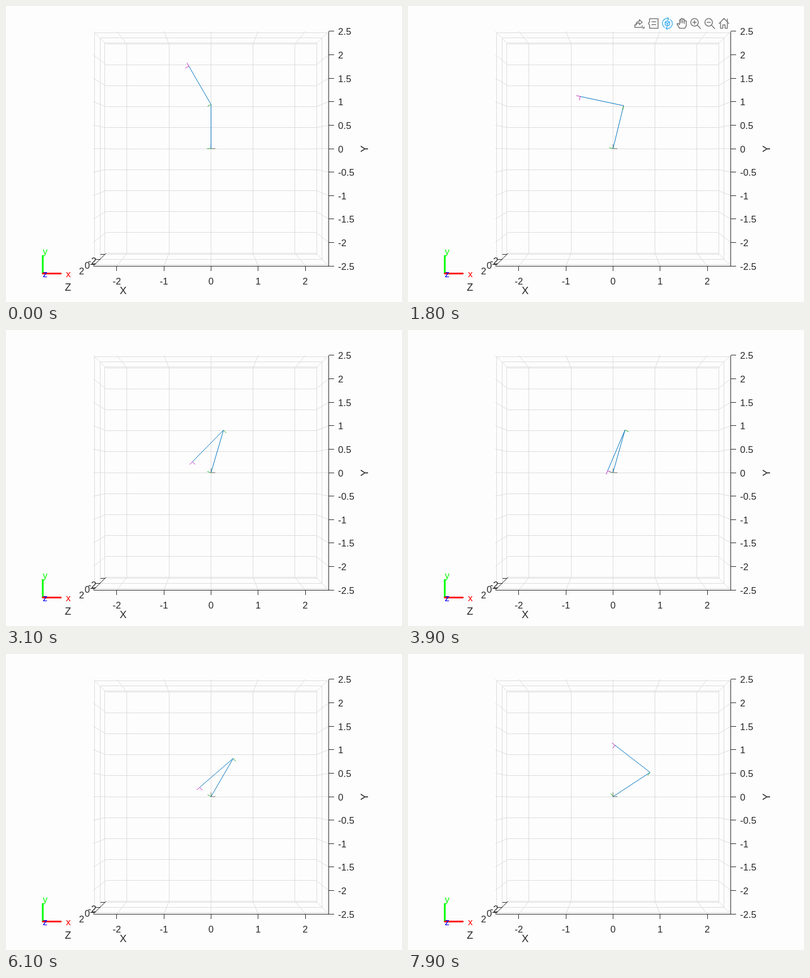
Recreate the animation shown at these times as an HTML page. Size 700x525 px, loop 8 s.

```html
<!DOCTYPE html>
<html lang="en">
<head>
<meta charset="utf-8">
<title>Two-link arm</title>
<style>
  html, body { margin: 0; width: 100%; height: 100%; overflow: hidden; background: #fdfdfd; }
  svg { display: block; width: 700px; height: 525px; font-family: "Liberation Sans", Arial, sans-serif; }
  text { font-size: 16.67px; fill: #262626; }
  .name { font-size: 18.3px; }
  .mid { text-anchor: middle; }
  .grid, .axis { fill: none; stroke-width: 1; }
  .grid { stroke: #dcdcdc; }
  .axis { stroke: #262626; }
  .crisp { shape-rendering: crispEdges; }
  #arm { fill: none; stroke-width: 1; }
  #tools { fill: none; stroke: #757575; stroke-width: 1.5; stroke-linecap: round; stroke-linejoin: round;
    animation: show 8s step-end infinite; }
  @keyframes show { 0% { opacity: 0; } 6.25% { opacity: 1; } 28.75% { opacity: 0; } }
</style>
</head>
<body>
<svg viewBox="0 0 700 525">
  <path id="grid" class="grid crisp"/>
  <path id="slant" class="grid"/>
  <path id="axis" class="axis crisp"/>
  <path id="depth" class="axis"/>
  <g id="labels">
    <text x="145" y="458">-2</text>
    <text x="139" y="466">0</text>
    <text x="129" y="476">2</text>
    <text class="name mid" x="207" y="511">X</text>
    <text class="name mid" x="109.5" y="505">Z</text>
    <text class="name mid" transform="translate(640 253.5) rotate(-90)">Y</text>
  </g>

  <g fill="none" stroke-width="3">
    <path d="M65 442V475" stroke="#0f0"/>
    <path d="M64 474.5H98" stroke="#f00"/>
  </g>
  <text x="65" y="441" style="fill:#0f0">y</text>
  <text x="106" y="481" style="fill:#f00">x</text>
  <text x="65" y="481" style="fill:#00f">z</text>

  <g id="arm">
    <path id="world" stroke="#6f6f5c"/>
    <path id="baseY" stroke="#26a826"/>
    <path id="links" stroke="#0072bd"/>
    <path id="elbowY" stroke="#26a826"/>
    <path id="tip" stroke="#c22fc2"/>
  </g>

  <g id="tools">
    <path d="M401 33V38H414V35M403 34C403 29 406 27 409 27V24L414 29L409 33V30C406 30 404 31 403 34Z"/>
    <path d="M418 36V40H414Z" fill="#757575" stroke="none"/>
    <path d="M427 22.5H442V39.5H427V34L425 31L427 28ZM431 28H438M431 33H438"/>
    <g stroke="#4db5f2">
      <path d="M453.5 38A8.7 8.7 0 0 1 461 22.500M463.500 24A8.700 8.700 0 0 1 456 39.500M459 20.500L461 22.500L459 25M458 37L456 39.500L458 41.500"/>
      <path d="M458.5 26.5L462.5 28.5V33L458.5 35.5L454.5 33V28.5ZM454.5 28.5L458.5 31L462.5 28.5M458.5 31V35.5"/>
    </g>
    <path d="M480 39.5L475.5 32Q476 30 479 32L480 33V25Q481.5 23 482.5 25V30V23Q484 21 485.5 23V30V24Q487 22 488.5 24V31V27Q490.5 25 492 27V33Q492 37 489 39.5Z"/>
    <g id="lens"><circle cx="506.5" cy="29" r="6.7"/><path d="M511.5 34L517 40M503.5 29H509.5"/></g>
    <use href="#lens" x="25"/>
    <path d="M506.5 26V32"/>
    <path d="M550 31L558.5 22L567 31M552.5 29V39.5H556.5V33.5H560.5V39.5H564.5V29M564.5 27V23"/>
  </g>
</svg>
<script>
const CX = 362.4, CY = 253, FRONT = 83.3, BACK = 74.2, LINK = 78.4;
const el = id => document.getElementById(id);
const set = (id, d) => el(id).setAttribute("d", d);
const line = (x1, y1, x2, y2) => `M${x1} ${y1}L${x2} ${y2}`;
const snap = v => Math.floor(v) + 0.5;
const pixelLine = (...p) => line(...p.map(snap));
const scaleAt = z => 1 / (1 / BACK + (z + 2.5) / 5 * (1 / FRONT - 1 / BACK));

function label(text, x, y, cls) {
  const t = document.createElementNS("http://www.w3.org/2000/svg", "text");
  t.textContent = text;
  t.setAttribute("x", x);
  t.setAttribute("y", y);
  t.setAttribute("class", cls);
  el("labels").append(t);
}

function drawBox() {
  const f = 2.5 * FRONT, b = 2.5 * BACK;
  const left = CX - f, right = CX + f, top = CY - f, bottom = CY + f;
  let grid = "", slant = "";
  let axis = pixelLine(left, bottom, right, bottom) + pixelLine(right, top, right, bottom);
  for (const z of [-2, 0, 2]) {
    const h = 2.5 * scaleAt(z);
    for (const s of [-h, h]) {
      grid += pixelLine(CX - h, CY + s, CX + h, CY + s) + pixelLine(CX + s, CY - h, CX + s, CY + h);
    }
    axis += pixelLine(CX - h - 8.5, CY + h, CX - h, CY + h);
  }
  for (let y = -2.5; y <= 2.5; y += 0.5) {
    const near = CY - y * FRONT, far = CY - y * BACK;
    grid += pixelLine(CX - b, far, CX + b, far);
    for (const s of [-1, 1]) slant += line(CX + s * f, near, CX + s * b, far);
    axis += pixelLine(right, near, right + 9, near);
    label(y, 587, Math.round(near + 6.5), "");
  }
  for (let x = -2; x <= 2; x++) {
    const near = CX + x * FRONT, far = CX + x * BACK;
    grid += pixelLine(far, CY - b, far, CY + b);
    for (const s of [-1, 1]) slant += line(near, CY + s * f, far, CY + s * b);
    axis += pixelLine(near, bottom, near, bottom + 8.5);
    label(x, near, 494, "mid");
  }
  set("grid", grid);
  set("slant", slant);
  set("axis", axis);
  set("depth", line(left, bottom, CX - b, CY + b));
}

// seconds, shoulder angle, elbow angle in degrees
const KEYS = [
  [-0.9, 85.3, 50], [0, 90, 30], [0.9, 85.3, 50], [1.8, 76.2, 91.7], [2.7, 73.8, 135.5],
  [3.6, 74, 167.3], [4.8, 74.8, 180], [5.4, 69.2, 174.8], [6.1, 60, 161],
  [6.9, 46.7, 139.3], [7.9, 33.3, 108.9], [8.9, 20, 78]
];

function angleAt(t, c) {
  let i = 1;
  while (i < KEYS.length - 3 && t >= KEYS[i + 1][0]) i++;
  const slope = k => (KEYS[k + 1][c] - KEYS[k - 1][c]) / (KEYS[k + 1][0] - KEYS[k - 1][0]);
  const [p, q] = [KEYS[i], KEYS[i + 1]], d = q[0] - p[0], u = (t - p[0]) / d, v = 1 - u;
  const deg = v * v * (1 + 2 * u) * p[c] + u * u * (1 + 2 * v) * q[c]
    + d * u * v * (v * slope(i) - u * slope(i + 1));
  return deg * Math.PI / 180;
}

const move = ([x, y], a, r) => [x + r * Math.cos(a), y - r * Math.sin(a)];
const ray = (p, a, r) => line(...p, ...move(p, a, r));

function drawArm(t) {
  const a = angleAt(t, 1), b = a + angleAt(t, 2), side = Math.PI / 2;
  const base = [CX, CY], elbow = move(base, a, LINK), end = move(elbow, b, LINK);
  set("world", ray(base, 0, 7.7) + ray(base, side, 7.7));
  set("baseY", ray(base, a + side, 7));
  set("elbowY", ray(elbow, b + side, 7));
  set("links", line(...base, ...elbow) + line(...elbow, ...end));
  set("tip", ray(end, b, 7) + ray(end, b + side, 7));
}

function tick(now) {
  drawArm(Math.floor(now % 8000 / 100) / 10);
  requestAnimationFrame(tick);
}

drawBox();
drawArm(0);
requestAnimationFrame(tick);
</script>
</body>
</html>
```
